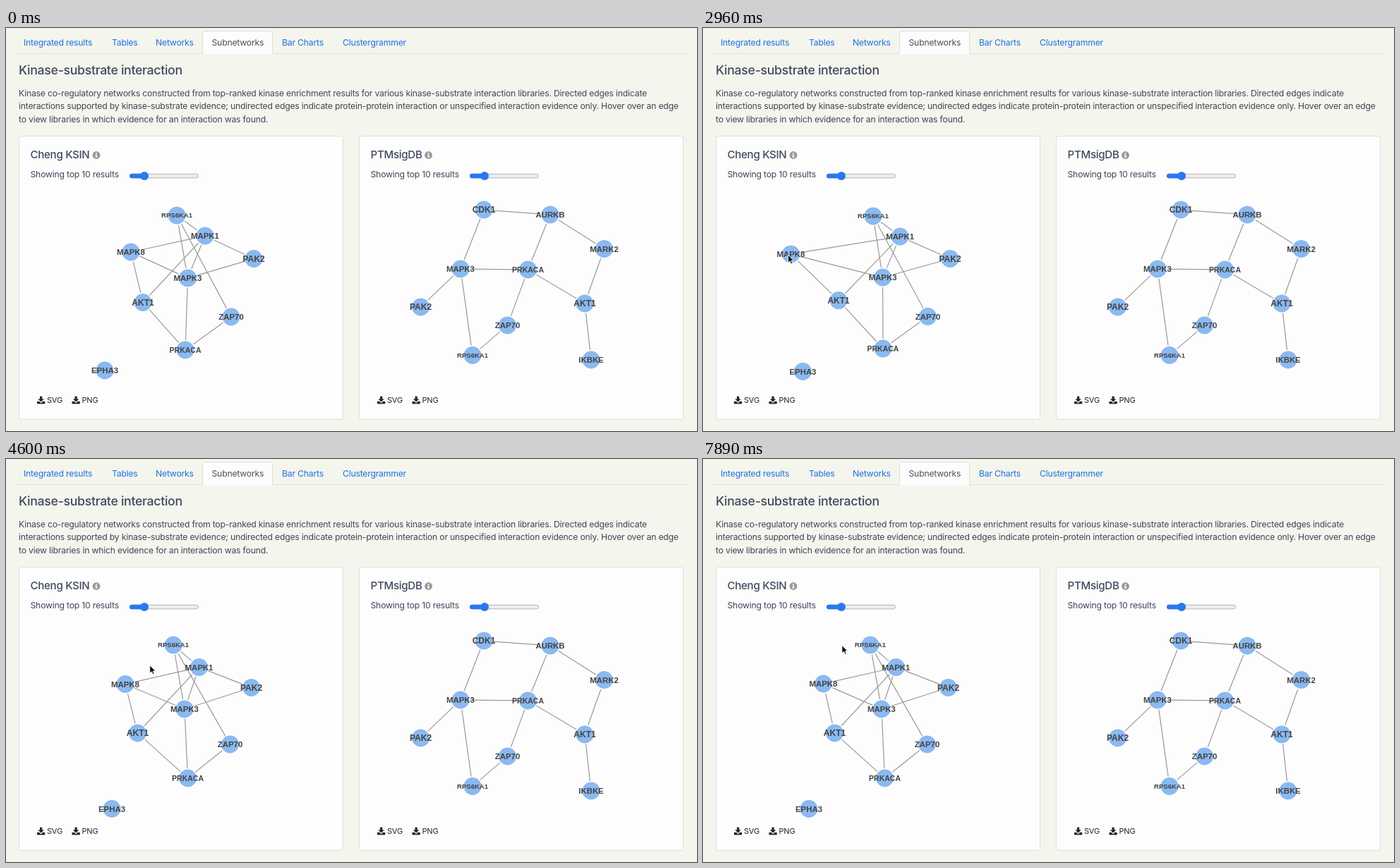
These frames come from a looping animation (979x572 px, 7.99 s). An HTML page:

```html
<!DOCTYPE html>
<html lang="en">
<head>
<meta charset="utf-8">
<title>Kinase-substrate interaction</title>
<style>
  html, body { margin: 0; width: 100%; height: 100%; overflow: hidden; background: #f4f5ec; }
  svg { display: block; width: 979px; height: 572px; }
  text { font: 12.2px Inter, sans-serif; letter-spacing: -.2px; fill: #3d4759; }
  .tab { fill: #1d70e4; }
  .active { fill: #495057; }
  .title { font-size: 17.7px; font-weight: 500; letter-spacing: -.3px; fill: #3f4a5d; }
  .name { font-size: 15.1px; font-weight: 500; letter-spacing: -.3px; fill: #3f4a5d; }
  .save { font-size: 11px; fill: #212529; }
  .box { fill: #fdfdfd; stroke: #dddfd9; }
  .edge { stroke: #999; stroke-width: 1.2; }
  .node circle { fill: #8bb9f0; }
  .node text { font-family: "Liberation Sans", Arial, sans-serif; font-weight: 700; letter-spacing: 0; fill: #434343; text-anchor: middle; }
</style>
</head>
<body>
<svg id="stage" viewBox="0 0 979 572">
  <defs>
    <g id="download">
      <path d="M4 0h3.2v3.8h2.6L5.6 8 1.4 3.8H4z"/>
      <path d="M0 7.3h3.2l2.4 2.3L8 7.3h3.2v3.5H0z"/>
    </g>
    <g id="info">
      <circle r="5.4" fill="#999"/>
      <path d="M-.9-3.4h1.8v1.6H-.9zM-1.5-.9H.9v3h.7v1.1h-3.1V2.1h.7V.2h-.7z" fill="#fdfdfd"/>
    </g>
    <g id="slider">
      <rect x=".5" y="-2.8" width="97" height="5.6" rx="2.8" fill="#ececec" stroke="#b4b4b4"/>
      <rect y="-3.2" width="24" height="6.4" rx="3.2" fill="#2a78f0"/>
      <circle cx="21" r="6" fill="#2a78f0"/>
    </g>
  </defs>
  <path d="M11 36.5H966" stroke="#dfe1da"/>
  <path class="box" d="M278.5 36.5V7.5q0-3 3-3h93q3 0 3 3v29"/>
  <path d="M279 36.5H377" stroke="#fdfdfd"/>
  <text class="tab" x="25" y="24.5">Integrated results</text>
  <text class="tab" x="150" y="24.5">Tables</text>
  <text class="tab" x="212" y="24.5">Networks</text>
  <text class="active" x="291.5" y="24.5">Subnetworks</text>
  <text class="tab" x="391" y="24.5">Bar Charts</text>
  <text class="tab" x="477" y="24.5">Clustergrammer</text>
  <text class="title" x="18" y="66">Kinase-substrate interaction</text>
  <text x="18" y="96.5">Kinase co-regulatory networks constructed from top-ranked kinase enrichment results for various kinase-substrate interaction libraries. Directed edges indicate</text>
  <text x="18" y="115">interactions supported by kinase-substrate evidence; undirected edges indicate protein-protein interaction or unspecified interaction evidence only. Hover over an edge</text>
  <text x="18" y="133.5">to view libraries in which evidence for an interaction was found.</text>
  <g id="cards"></g>
  <g id="graphs"></g>
  <path id="cursor" d="M0 0V11.2L2.6 8.8 4.4 12.8 6.3 12 4.5 8.1H8z" fill="#000" stroke="#fff" stroke-width=".9"/>
</svg>
<script>
const LOOP = 7990, FIRST = 1786, STEP = 96.4;
const POSE_TIMES = [2470, 2960, 3440, 4600, 5270];
const FONT_SIZES = { 4: 12, 5: 11.4, 6: 10.5, 7: 9.5 };
const RADIUS = 12.5, GAP = 14;
const $ = id => document.getElementById(id);

const cards = [
  {
    x: 0, name: 'Cheng KSIN', infoX: 128,
    nodes: {
      RPS6KA1: '242,266 241,267 237,266 237,264',
      MAPK1: '282,295 279,296 273,297 273.5,295.5',
      MAPK8: '177,318 123,321 154,323 169,319.5 170.5,319',
      PAK2: '351,327.5 350,327.5 345.5,325 347.5,324.5',
      MAPK3: '257.5,355 254.5,354 249.5,354.5 253,355',
      AKT1: '194,389.5 192,386.5 187,384.5 186.5,389',
      ZAP70: '319,410 318.5,409.5 318.5,406.5 317.5,405',
      PRKACA: '254,457 255,455 256,452 257.5,453',
      EPHA3: '140,486 141.5,487.5 148,492.5 150,496.5'
    },
    edges: 'RPS6KA1-MAPK1 RPS6KA1-MAPK3 RPS6KA1-ZAP70 MAPK1-MAPK8 MAPK1-MAPK3 MAPK1-AKT1 MAPK1-PAK2 MAPK8-MAPK3 MAPK8-AKT1 PAK2-MAPK3 MAPK3-PRKACA AKT1-PRKACA ZAP70-PRKACA'
  },
  {
    x: 482, name: 'PTMsigDB', infoX: 116.5,
    nodes: {
      CDK1: '677,258', AURKB: '771,265', MARK2: '847.5,313.5', MAPK3: '644,342',
      PRKACA: '739.5,343', AKT1: '820,391', PAK2: '587.5,396', ZAP70: '710.5,422',
      RPS6KA1: '661,464.5', IKBKE: '829,471'
    },
    edges: 'CDK1-AURKB CDK1-MAPK3 AURKB-PRKACA AURKB-MARK2 MARK2-AKT1 MAPK3-PRKACA MAPK3-PAK2 MAPK3-RPS6KA1 PRKACA-AKT1 PRKACA-ZAP70 ZAP70-RPS6KA1 AKT1-IKBKE'
  }
];

const cursorTrack = [
  [1790, 18, 345], [2280, 158, 314], [2470, 173, 319], [2960, 119, 322], [3100, 114, 318],
  [3540, 114, 318], [4300, 200, 291], [4600, 204, 293], [5300, 204, 293], [6030, 206, 309],
  [7600, 206, 309], [7890, 196, 260]
];

function add(parent, tag, attrs, text = '') {
  const el = document.createElementNS('http://www.w3.org/2000/svg', tag);
  for (const key in attrs) el.setAttribute(key, attrs[key]);
  el.textContent = text;
  return parent.appendChild(el);
}

const linear = u => u;
const easeOut = u => 1 - (1 - u) ** 3;

function sample(track, t, ease = () => linear) {
  const i = track.findIndex(key => key[0] > t);
  if (i === 0) return track[0].slice(1);
  if (i < 0) return track[track.length - 1].slice(1);
  const [t0, x0, y0] = track[i - 1], [t1, x1, y1] = track[i];
  const u = ease(t0)((t - t0) / (t1 - t0));
  return [x0 + (x1 - x0) * u, y0 + (y1 - y0) * u];
}

function buildCard(card) {
  const g = add($('cards'), 'g', { transform: `translate(${card.x})` });
  add(g, 'rect', { class: 'box', x: 18.5, y: 153.5, width: 459, height: 402, rx: 3 });
  add(g, 'text', { class: 'name', x: 34.5, y: 185 }, card.name);
  add(g, 'use', { href: '#info', x: card.infoX, y: 180.5 });
  add(g, 'text', { x: 34.5, y: 211.5 }, 'Showing top 10 results');
  add(g, 'use', { href: '#slider', x: 175, y: 210 });
  [['SVG', 44], ['PNG', 93.5]].forEach(([label, x]) => {
    add(g, 'use', { href: '#download', x, y: 522.8, fill: '#212529' });
    add(g, 'text', { class: 'save', x: x + 14, y: 532 }, label);
  });
}

function buildGraph(card) {
  const g = add($('graphs'), 'g', {});
  const edges = card.edges.split(' ').map(pair => ({ ends: pair.split('-'), el: add(g, 'line', { class: 'edge' }) }));
  const nodes = {};
  for (const name in card.nodes) {
    const el = add(g, 'g', { class: 'node' });
    const size = FONT_SIZES[name.length];
    add(el, 'circle', { r: RADIUS });
    add(el, 'text', { y: size * .36, style: `font-size:${size}px` }, name);
    const track = card.nodes[name].split(' ').map((p, i) => [POSE_TIMES[i], ...p.split(',').map(Number)]);
    nodes[name] = { el, track };
  }
  return { nodes, edges };
}

cards.forEach(buildCard);
const graphs = cards.map(buildGraph);
// The dragged node follows the pointer until it is released.
graphs[0].nodes.MAPK8.track.splice(2, 0, [3100, 118, 317]);

const settle = start => start >= 3100 ? easeOut : linear;

function drawGraph({ nodes, edges }, t) {
  for (const node of Object.values(nodes)) {
    node.pos = sample(node.track, t, settle);
    node.el.setAttribute('transform', `translate(${node.pos})`);
  }
  for (const { ends, el } of edges) {
    const [[ax, ay], [bx, by]] = ends.map(name => nodes[name].pos);
    const k = GAP / Math.hypot(bx - ax, by - ay);
    const dx = (bx - ax) * k, dy = (by - ay) * k;
    el.setAttribute('x1', ax + dx);
    el.setAttribute('y1', ay + dy);
    el.setAttribute('x2', bx - dx);
    el.setAttribute('y2', by - dy);
  }
}

function render() {
  const now = performance.now() % LOOP;
  const t = FIRST + 4 + Math.floor((now - FIRST) / STEP) * STEP;
  graphs.forEach(graph => drawGraph(graph, t));
  $('cursor').setAttribute('visibility', now < FIRST ? 'hidden' : 'visible');
  $('cursor').setAttribute('transform', `translate(${sample(cursorTrack, t)})`);
  requestAnimationFrame(render);
}
render();
</script>
</body>
</html>
```
